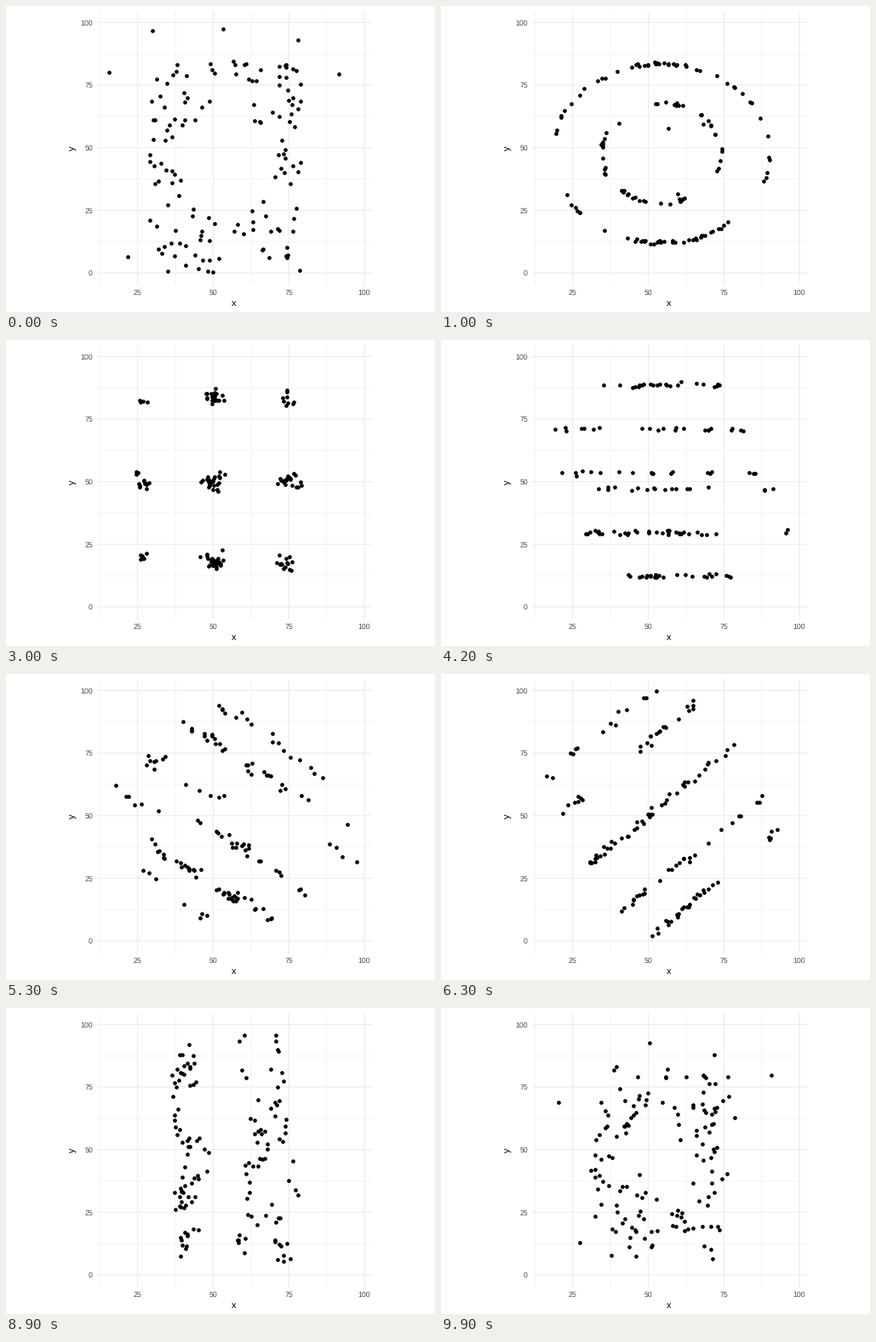
Animation of 504 by 360 pixels, one loop 10 s. Source, as a matplotlib script:

```python
import numpy as np
import matplotlib.pyplot as plt
from matplotlib.animation import FuncAnimation

WIDTH, HEIGHT, DPI = 504, 360, 72
FRAMES, INTERVAL = 100, 100
DOTS = 142
PANEL = (106.5, 5.6, 429.6, 328.6)  # left, top, right, bottom in pixels
XLIM, YLIM = (11.43, 102.4), (-4.96, 104.68)
CENTER = np.array([54.26, 47.83])

plt.rcParams["font.family"] = "Liberation Sans"
plt.rcParams["text.hinting"] = "none"
rng = np.random.default_rng(12)


def along(count, *corners):
    """Spread dots evenly along a polyline."""
    corners = np.array(corners, float)
    steps = np.hypot(*np.diff(corners, axis=0).T)
    length = np.concatenate([[0], np.cumsum(steps)])
    at = np.linspace(0, length[-1], count)
    return np.column_stack([np.interp(at, length, c) for c in corners.T])


def arc(center, radii, turns):
    a = 2 * np.pi * np.asarray(turns)
    return center + np.column_stack([np.cos(a), np.sin(a)]) * radii


def dinosaur():
    return np.vstack([
        along(32, (55, 97), (36, 80), (22, 62), (25, 51), (40, 51), (57, 56), (62, 69)),
        along(15, (57, 55), (48, 38), (39, 31), (31, 34), (38, 49)),     # neck and hand
        along(25, (30, 36), (33, 26), (44, 26), (58, 44), (70, 50), (70, 69)),  # arm
        arc((51.5, 81.5), (5, 4.5), np.linspace(0, 0.9, 11)),            # eye
        along(20, (58, 99.5), (71, 91), (83, 55), (98, 34)),             # back and tail
        along(6, (57, 41), (64, 24)),                                    # leg
        along(12, (74, 23), (45, 14)),
        along(8, (49, 15), (56, 14), (46, 6)),                           # foot
        along(13, (50, 10), (78, 10), (68, 3)),
    ])


def inside(dots):
    return np.clip(dots, (15, 0.4), (98.2, 99.7))


def hollow_cloud():
    """Two loose columns that bend away from the centre, plus a few strays."""
    strays = [(15.6, 80), (91.6, 79.4), (53.2, 97.4), (30, 96.7), (78, 93), (21.8, 6.6)]
    n = DOTS - len(strays)
    y = rng.uniform(0, 88, n)
    gap = 2 + 15 * np.exp(-((y - 46) / 17) ** 2)
    offset = gap + (25 - gap) * rng.random(n)
    side = np.where(np.arange(n) % 2, 1, -1)
    return rng.permutation(np.vstack([strays, np.column_stack([54 + side * offset, y])]))


dino = dinosaur()


def drifted():
    return dino + rng.normal(0, 2.3, dino.shape)


def snap_to(segments, jitter=0.4):
    """Move each drifted dot to about the nearest point of the segments."""
    dots = drifted()
    a, b = (np.array(ends, float) for ends in zip(*segments))
    d = b - a
    t = ((dots[:, None] - a) * d).sum(2) / np.maximum((d * d).sum(1), 1e-9)
    near = a + np.clip(t, 0, 1)[..., None] * d
    best = np.hypot(*np.moveaxis(dots[:, None] - near, 2, 0)).argmin(1)
    return inside(near[np.arange(DOTS), best] + rng.normal(0, jitter, dots.shape))


def closed(corners):
    return list(zip(corners, np.roll(corners, -1, axis=0)))


def ring(radius):
    return closed(arc(CENTER, radius, np.linspace(0, 1, 90, endpoint=False)))


def two_bands(axis, split, low, high):
    """Squeeze both halves of one axis towards a band."""
    dots = drifted()
    v = dots[:, axis]
    dots[:, axis] = np.where(v > split, high, low) + 0.28 * (v - split) + rng.normal(0, 1.5, DOTS)
    return inside(dots)


def star():
    turns = 0.25 + np.arange(10) / 10
    radii = np.where(np.arange(10) % 2, 14, 36)[:, None]
    return closed(arc((60, 53), radii * np.array([0.95, 1.08]), turns))


LEVELS = (10, 30, 50, 70, 90)
SLANTS = (-49, -29.5, 0, 29.5, 49)

states = [
    hollow_cloud(),
    snap_to(ring(18) + ring(37)),
    snap_to(ring(30)),
    dino,
    snap_to([((x, y), (x, y)) for x in (26, 50, 75) for y in (18, 50, 83)], 1.4),
    snap_to([((0, y), (110, y)) for y in LEVELS]),
    two_bands(1, 50, 34, 71),
    snap_to([((0, 100 + s), (110, s - 10)) for s in SLANTS], 0.7),
    snap_to([((0, s), (110, 110 + s)) for s in SLANTS], 0.7),
    snap_to(star()),
    snap_to([((x, 0), (x, 100)) for x in LEVELS], 0.3),
    two_bands(0, 54, 44, 64),
    snap_to([((20, 0), (100, 100)), ((20, 100), (100, 0))], 0.7),
]


def schedule(k):
    """First moving frame and step count of the k-th change."""
    return 2 + 8 * k - max(0, k - 10), 6 if k < 10 else 5


def positions(frame):
    dots = states[0]
    for k in range(len(states)):
        start, steps = schedule(k)
        t = np.clip((frame - start + 1) / steps, 0, 1)
        dots = (1 - t) * dots + t * states[(k + 1) % len(states)]
    return dots


fig = plt.figure(figsize=(WIDTH / DPI, HEIGHT / DPI), dpi=DPI, facecolor="white")
left, top, right, bottom = PANEL
ax = fig.add_axes([left / WIDTH, 1 - bottom / HEIGHT,
                   (right - left) / WIDTH, (bottom - top) / HEIGHT])
ax.set(xlim=XLIM, ylim=YLIM)
ax.axis("off")


def label(x, y, text, size, color, ha="center", va="baseline", **kw):
    fig.text(x / WIDTH, 1 - y / HEIGHT, text, fontsize=size, color=color, ha=ha, va=va, **kw)


def to_pixels(x, y):
    px, py = ax.transData.transform((x, y))
    return px, HEIGHT - py


for v in np.arange(0, 101, 12.5):
    major = v % 25 == 0
    style = dict(color="#EBEBEB", lw=1.07 if major else 0.53, snap=False, zorder=1 + major)
    ax.axhline(v, **style)
    if v > 0:
        ax.axvline(v, **style)
    if major:
        px, py = to_pixels(v, v)
        label(102, py + 3.2, f"{v:.0f}", 8.8, "#4D4D4D", ha="right")
        if v > 0:
            label(px, 340, f"{v:.0f}", 8.8, "#4D4D4D")

label((left + right) / 2, 353, "x", 11, "black")
label(79, 167, "y", 11, "black", va="center", rotation=90)

points = ax.scatter(*states[0].T, s=22, c="black", linewidths=0, zorder=3, clip_on=False)


def update(frame):
    points.set_offsets(positions(frame))
    return (points,)


anim = FuncAnimation(fig, update, frames=FRAMES, interval=INTERVAL,
                     repeat=True, repeat_delay=0, blit=False)
plt.show()
```
